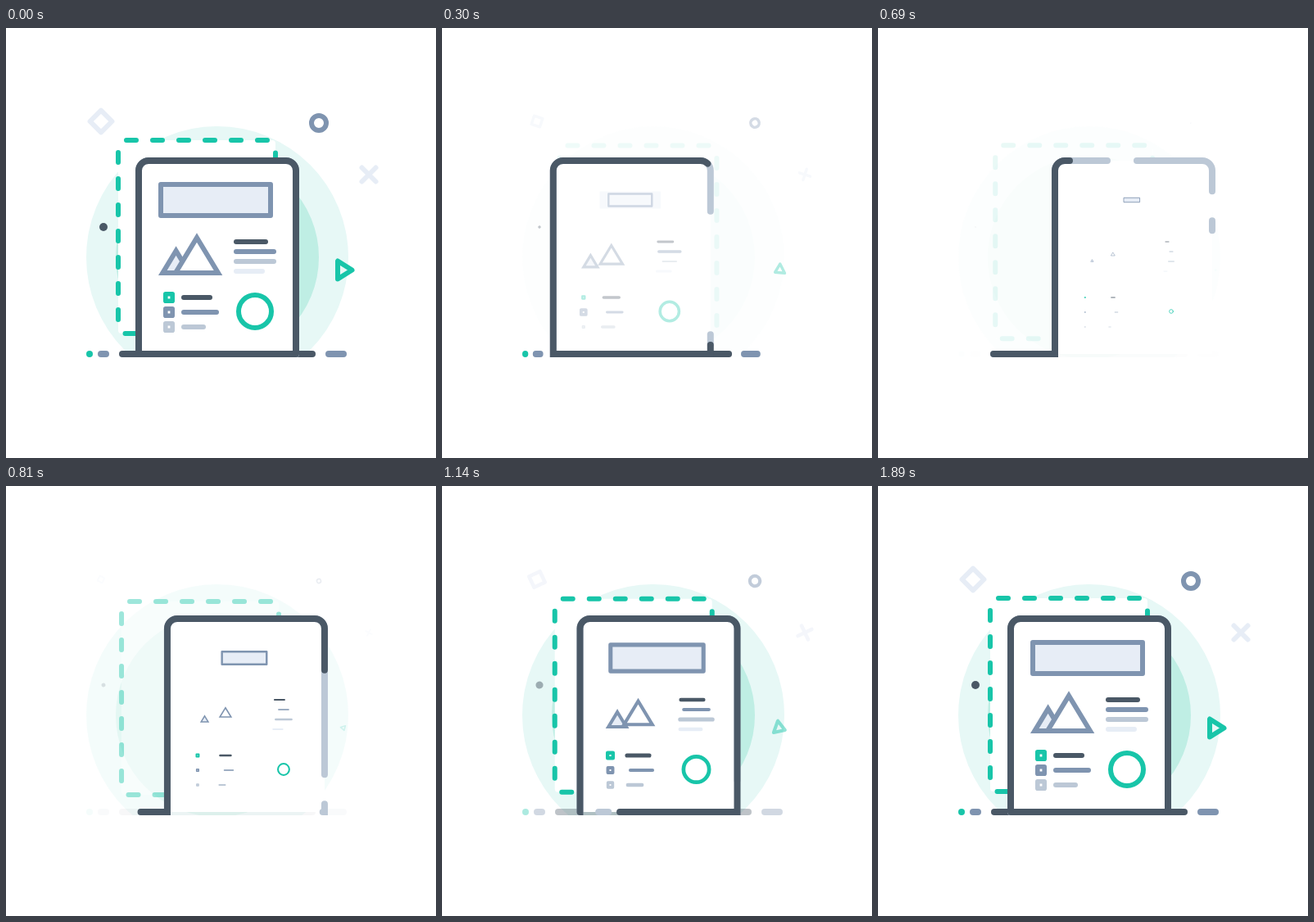
Write an HTML page that moves like this. It is 525 by 525 pixels and loops after 2250 ms.

```html
<!DOCTYPE html>
<html lang="en">
<head>
<meta charset="utf-8">
<title>Page layout loop</title>
<style>
  html, body { margin: 0; width: 100%; height: 100%; overflow: hidden; background: #fff; }
  svg { display: block; width: 100%; height: 100%; }
</style>
</head>
<body>
<svg id="stage" viewBox="0 0 525 525" fill="none" stroke-linecap="round">
  <defs><clipPath id="ground"><path d="M0 0H525V402H0Z"/></clipPath></defs>
  <g id="disc" clip-path="url(#ground)">
    <circle cx="258" cy="280" r="160" fill="#e7f8f6"/>
    <circle cx="258" cy="280" r="124" fill="#bfeee4"/>
  </g>
  <g id="dashed" stroke="#18c5a9" stroke-width="6" stroke-dasharray="12 20">
    <rect x="137" y="137" width="192" height="236" rx="4" fill="#fff" stroke="none"/>
    <path d="M147 137H322M137 152V360M329 152.5V360M145.5 373H320"/>
  </g>
  <g id="base" stroke-width="8">
    <circle cx="102" cy="398" r="4" fill="#18c5a9"/>
    <path d="M116 398H122M394 398H412" stroke="#7f94b0"/>
    <path d="M142 398H374" stroke="#4a5866"/>
  </g>
  <g id="floats"></g>
  <g id="page">
    <path d="M162 398V174A12 12 0 0 1 174 162H342A12 12 0 0 1 354 174V398Z" fill="#fff"/>
    <g id="outline" stroke-width="8"></g>
    <g id="content"></g>
  </g>
</svg>
<script>
const LOOP = 2250, STEP = 30, LAST = 1890, TURN = 525;
const DARK = '#4a5866', SLATE = '#7f94b0', PALE = '#bcc8d6', MIST = '#e7edf6', TEAL = '#18c5a9';
const $ = id => document.getElementById(id);
const clamp = v => Math.max(0, Math.min(1, v));

function add(parent, tag, attrs) {
  const node = document.createElementNS('http://www.w3.org/2000/svg', tag);
  for (const key in attrs) node.setAttribute(key, attrs[key]);
  return parent.appendChild(node);
}

// Each part grows with exponent nIn and shrinks with exponent nOut about its centre.
function part(layer, x, y, nIn, nOut, markup) {
  const node = add($(layer), 'g', {});
  node.innerHTML = markup;
  return { node, x, y, nIn, nOut };
}
const bar = (x1, x2, y, color, nIn, nOut) => {
  const half = (x2 - x1) / 2 - 3;
  return part('content', (x1 + x2) / 2, y, nIn, nOut,
    `<path d="M${-half} 0H${half}" stroke="${color}" stroke-width="6"/>`);
};
const box = (y, color, nIn, nOut) => part('content', 199, y, nIn, nOut,
  `<rect x="-4.2" y="-4.2" width="8.4" height="8.4" stroke="${color}" stroke-width="5.6" stroke-linejoin="round"/>`);
const peak = (x, y, w, h, low, fill) => part('content', x, y, 1.7, 1.85,
  `<path d="M0 ${low - h}L${w} ${low}H${-w}Z" fill="${fill}" stroke="${SLATE}" stroke-width="6"/>`);
const ring = (layer, x, y, r, color, nIn) => part(layer, x, y, nIn, 2.15,
  `<circle r="${r}" stroke="${color}" stroke-width="6"/>`);

const content = [
  part('content', 256, 210, 2.9, 2, `<rect x="-67" y="-19" width="134" height="38" fill="${MIST}"/>`),
  part('content', 256, 210, 2.9, 1.24,
    `<rect x="-67" y="-19" width="134" height="38" stroke="${SLATE}" stroke-width="6" stroke-linejoin="round"/>`),
  peak(207.6, 284, 16.3, 27, 15, MIST),
  peak(233, 276, 26, 43, 23, '#fff'),
  bar(278, 320, 261, DARK, 2.25, 1.7),
  bar(278, 330, 273, SLATE, 1.7, 2.07),
  bar(278, 330, 285, PALE, 3, 1.08),
  bar(278, 316, 297, MIST, 2.4, 1.8),
  box(329, TEAL, 2.4, 1.18),
  box(347, SLATE, 1.9, 2.9),
  box(365, PALE, 1.7, 0.85),
  bar(214, 252, 329, DARK, 2.9, 2.2),
  bar(214, 260, 347, SLATE, 1.75, 1.56),
  bar(214, 244, 365, PALE, 2, 2.2),
  ring('content', 304, 346, 20, TEAL, 2.35)
];

const floats = [
  part('floats', 116, 114, 2.3, 2.1,
    `<path d="M0 -13.4L13.4 0L0 13.4L-13.4 0Z" stroke="${MIST}" stroke-width="6" stroke-linejoin="round"/>`),
  ring('floats', 382, 116, 9, SLATE, 1.8),
  part('floats', 443, 179, 2.3, 2.1, `<path d="M-8.5 -8.5L8.5 8.5M8.5 -8.5L-8.5 8.5" stroke="${MIST}" stroke-width="6"/>`),
  part('floats', 412, 295.5, 1.8, 2.1,
    `<path d="M-7 -11V11L10.5 0Z" stroke="${TEAL}" stroke-width="6" stroke-linejoin="round"/>`),
  part('floats', 119, 243, 3.7, 1.05, `<circle r="5" fill="${DARK}"/>`)
];

// The outline is measured clockwise from the lower left corner of the page.
const AROUND = 'V174A12 12 0 0 1 174 162H342A12 12 0 0 1 354 174V398';
const PERIMETER = 640 + 192 + 12 * Math.PI - 24;
const CORNER = PERIMETER - 192;
const tracks = {
  arrive: { d: `M-138 398H162${AROUND}H162`, lead: 300 },
  leave: { d: `M354 174V398H162${AROUND}`, lead: 416 }
};
const strokes = [PALE, PALE, PALE, DARK].map(stroke => add($('outline'), 'path', { stroke }));

function drawSpan(stroke, track, from, to) {
  const shown = to > from;
  stroke.setAttribute('visibility', shown ? 'visible' : 'hidden');
  if (!shown) return;
  stroke.setAttribute('d', track.d);
  stroke.setAttribute('stroke-dasharray', `${to - from} 9999`);
  stroke.setAttribute('stroke-dashoffset', -(from + track.lead));
}

function drawArrival(t) {
  const left = (end, span, power) => clamp((end - t) / span) ** power;
  const tail = -75 * left(1181, 491, 3);
  const dark = PERIMETER - 597 * left(1485, 795, 3);
  const head = PERIMETER - 343 * left(1767, 1077, 5);
  const spans = [[head - 12, head], [head - 172, head - 48], [tail, head - 208], [tail, dark]];
  spans.forEach(([a, b], i) => drawSpan(strokes[i], tracks.arrive, Math.max(a, tail), b));
}

function drawDeparture(t) {
  const u = t / 450;
  const start = -192;
  const head = start - 80 * u ** 3;
  const paleTail = CORNER - 543 * u ** 2.8;
  const darkHead = start - 14 * u ** 0.6;
  const darkTail = CORNER - 563 * u ** 2.17;
  const spans = [[head, Math.min(head + 12, paleTail)], [0, 0], [head + 48, paleTail], [darkHead, darkTail]];
  if (head > darkHead) spans[0] = [0, 0];
  spans.forEach(([a, b], i) => drawSpan(strokes[i], tracks.leave, a, b));
}

function place(p, scale, alpha, turn = 0) {
  p.node.setAttribute('transform', `translate(${p.x} ${p.y}) rotate(${turn}) scale(${scale})`);
  p.node.setAttribute('opacity', alpha);
}

function render(t) {
  const leaving = t < TURN;
  const out = clamp(t / 450);
  const grow = clamp((t - 635) / 1060);
  const size = p => leaving ? 1 - out ** p.nOut : 1 - (1 - grow) ** p.nIn;
  const shift = leaving ? -70.5 * (t / 450) ** 2.44 : 54 * clamp((1579 - t) / 889) ** 3;
  const backAlpha = leaving ? (1 - out) ** 2.5 : clamp((t - 657) / 369);
  const baseAlpha = leaving ? 1 : clamp((t - 650) / 823) ** 2;
  const baseScale = leaving ? Math.max(0, 1 - 0.007 * (t / 180) ** 4.9) : 1;
  const drift = leaving ? 3 * (t / 180) ** 1.5 : shift * 0.115;
  const turn = leaving ? 61 * (t / 180) ** 1.8 : 120 * (1 - grow) ** 2.8;

  $('disc').setAttribute('opacity', backAlpha);
  $('dashed').setAttribute('opacity', backAlpha);
  $('dashed').setAttribute('transform', `translate(${drift} ${drift})`);
  $('base').setAttribute('opacity', baseAlpha);
  $('base').setAttribute('transform', `translate(98 0) scale(${baseScale} 1) translate(-98 0)`);
  $('page').setAttribute('transform', `translate(${shift} 0)`);

  content.forEach(p => place(p, size(p), leaving ? 1 - out : 1));
  floats.forEach(p => place(p, size(p), leaving ? 1 - out : grow, turn));
  if (leaving) drawDeparture(t); else drawArrival(t);
}

const began = performance.now();
function tick() {
  const t = (performance.now() - began) % LOOP;
  render(Math.min(LAST, Math.floor(t / STEP) * STEP));
  requestAnimationFrame(tick);
}
tick();
</script>
</body>
</html>
```
